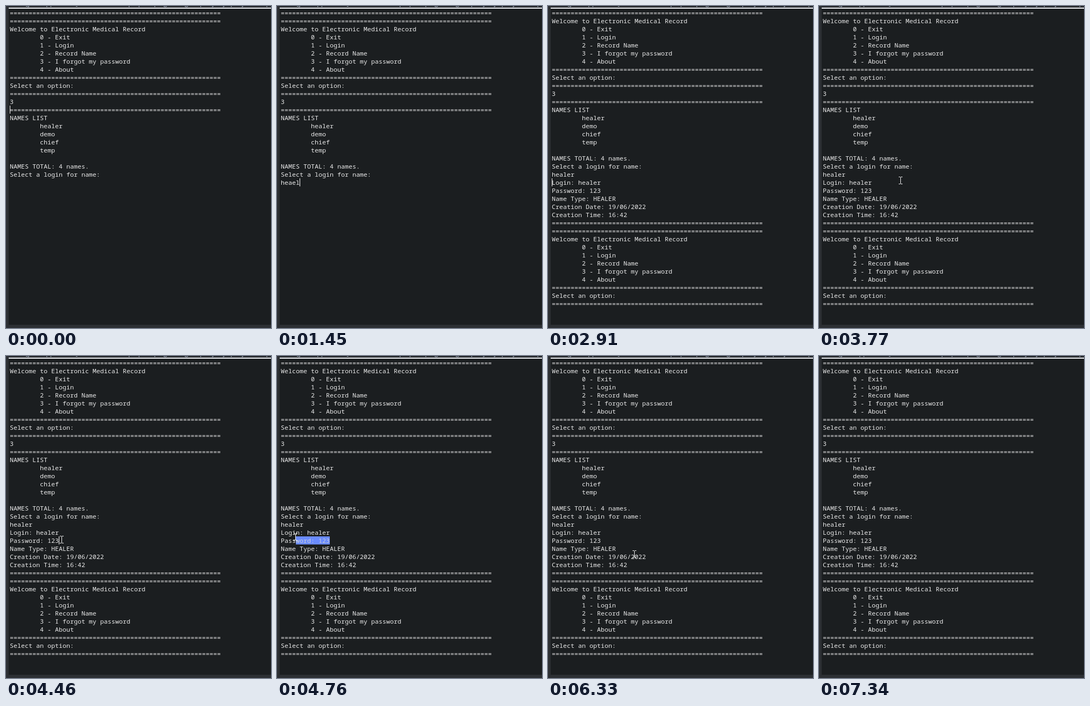
An HTML page for the animation above (7.46 s loop, 492x598 px).

```html
<!DOCTYPE html>
<html lang="en">
<head>
<meta charset="utf-8">
<title>Console</title>
<style>
  html, body { margin: 0; width: 100%; height: 100%; overflow: hidden; background: #2c2f33; }
  #stage { position: absolute; left: 0; top: 0; width: 492px; height: 598px; overflow: hidden; }
  #stage > * { position: absolute; }
  #title {
    left: 5px; top: -13px; height: 16px; white-space: pre;
    font: 12px/16px "Open Sans", sans-serif; color: #b9c3d6;
  }
  #console { left: 5px; top: 5px; width: 487px; height: 587px; background: #1b1e20; overflow: hidden; }
  #rule { left: 5px; top: 3px; width: 487px; height: 2px; background: #eceef2; }
  #text {
    position: absolute; left: 2px; top: 0; white-space: pre; color: #e9e9e9;
    font: 11.667px/15px "Noto Sans Mono", "DejaVu Sans Mono", monospace;
    font-variant-ligatures: none;
  }
  #text div { height: 15px; }
  .sel { display: inline-block; height: 15px; vertical-align: top; background: #6a8bff; color: #c9cfdc; }
  .eol { padding-right: 5px; }
  #caret { width: 1px; height: 15px; background: #fff; }
  #mouse { width: 7px; height: 14px; }
</style>
</head>
<body>
<div id="stage">
  <div id="title">Main [Java Application] C:\Homes\sam\.p2\pool\plugins\org.eclipse.justj.openjdk.hotspot.jre.full</div>
  <div id="console"><div id="text"></div></div>
  <div id="rule"></div>
  <div id="caret"></div>
  <svg id="mouse" viewBox="0 0 7 14">
    <path d="M0 .5H3M4 .5H7M3.5 1V13M0 13.5H3M4 13.5H7" fill="none" stroke="#f4f4f4"/>
  </svg>
</div>
<script>
const LOOP = 7460, CHAR = 7, ROW = 15, LEFT = 7, TOP = 5;
const $ = id => document.getElementById(id);
const bar = '='.repeat(56);
const tab = list => list.map(s => ' '.repeat(8) + s);

const menu = [
  bar, bar, 'Welcome to Electronic Medical Record',
  ...tab(['0 - Exit', '1 - Login', '2 - Record Name', '3 - I forgot my password', '4 - About']),
  bar, 'Select an option:', bar
];
const prompt = [
  ...menu, '3', bar, 'NAMES LIST',
  ...tab(['healer', 'demo', 'chief', 'temp']),
  '', 'NAMES TOTAL: 4 names.', 'Select a login for name:'
];
const reply = [
  ...prompt, 'healer', 'Login: healer', 'Password: 123', 'Name Type: HEALER',
  'Creation Date: 19/06/2022', 'Creation Time: 16:42', ...menu
].slice(1);

// Each step changes part of the state. caret: [column, row]; mouse: [x, y];
// sel: first selected column on rows 21 and 22 (null = none)
const type = (at, word) => [at, { typed: word, caret: [word.length, 21] }];
const move = (at, x, y, more) => [at, { mouse: [x, y], ...more }];
const steps = [
  [0, { typed: '', done: false, caret: [0, 12], mouse: null, sel: null }],
  [300, { caret: null }],
  type(730, 'h'), type(870, 'he'), type(1000, 'hea'), type(1450, 'heael'),
  type(2030, 'heae'), type(2180, 'hea'), type(2320, 'heal'),
  type(2470, 'heale'), type(2610, 'healer'),
  [2760, { caret: [0, 22] }],
  [2910, { done: true, caret: [0, 21] }],
  move(3370, 197, 313, { caret: null }),
  move(3500, 186, 315), move(3640, 169, 319), move(3770, 151, 324),
  move(3910, 134, 330, { caret: [0, 21] }),
  move(4040, 119, 336), move(4180, 109, 340), move(4310, 103, 341),
  [4460, { caret: [13, 22] }],
  move(4610, 72, 340, { caret: null, sel: [null, 9] }),
  move(4760, 34, 336, { sel: [null, 4] }),
  move(4910, 9, 328, { sel: [0, 0] }),
  move(5350, 45, 326), move(5490, 100, 322), move(5620, 130, 320),
  move(5760, 132, 314, { sel: null, caret: [6, 20] }),
  move(5900, 137, 335), move(6040, 141, 354),
  move(6330, 160, 368, { caret: null }),
  move(6470, 197, 396), move(6620, 248, 434), move(6760, 304, 474),
  move(6910, 361, 513, { caret: [6, 20] }),
  move(7050, 414, 548), move(7200, 455, 574),
  [7340, { mouse: null, caret: null }]
];

function line(s, from, eol) {
  if (from == null) return `<div>${s}</div>`;
  return `<div>${s.slice(0, from)}<span class="sel${eol ? ' eol' : ''}">${s.slice(from)}</span></div>`;
}

function place(el, pos) {
  el.style.display = pos ? 'block' : 'none';
  if (pos) {
    el.style.left = pos[0] + 'px';
    el.style.top = pos[1] + 'px';
  }
}

function draw(s) {
  const rows = s.done ? reply : [...prompt, s.typed];
  $('text').innerHTML = rows.map((r, i) => line(r, s.sel && s.sel[i - 21], i === 21)).join('');
  place($('caret'), s.caret && [LEFT + s.caret[0] * CHAR, TOP + s.caret[1] * ROW]);
  place($('mouse'), s.mouse && [s.mouse[0] - 3, s.mouse[1] - 7]);
}

let shown = 0;
const start = performance.now();
function tick() {
  const t = Math.max(0, performance.now() - start) % LOOP;
  const past = steps.filter(([at]) => at <= t);
  if (past.length !== shown) {
    shown = past.length;
    draw(Object.assign({}, ...past.map(p => p[1])));
  }
  requestAnimationFrame(tick);
}
tick();
</script>
</body>
</html>
```
